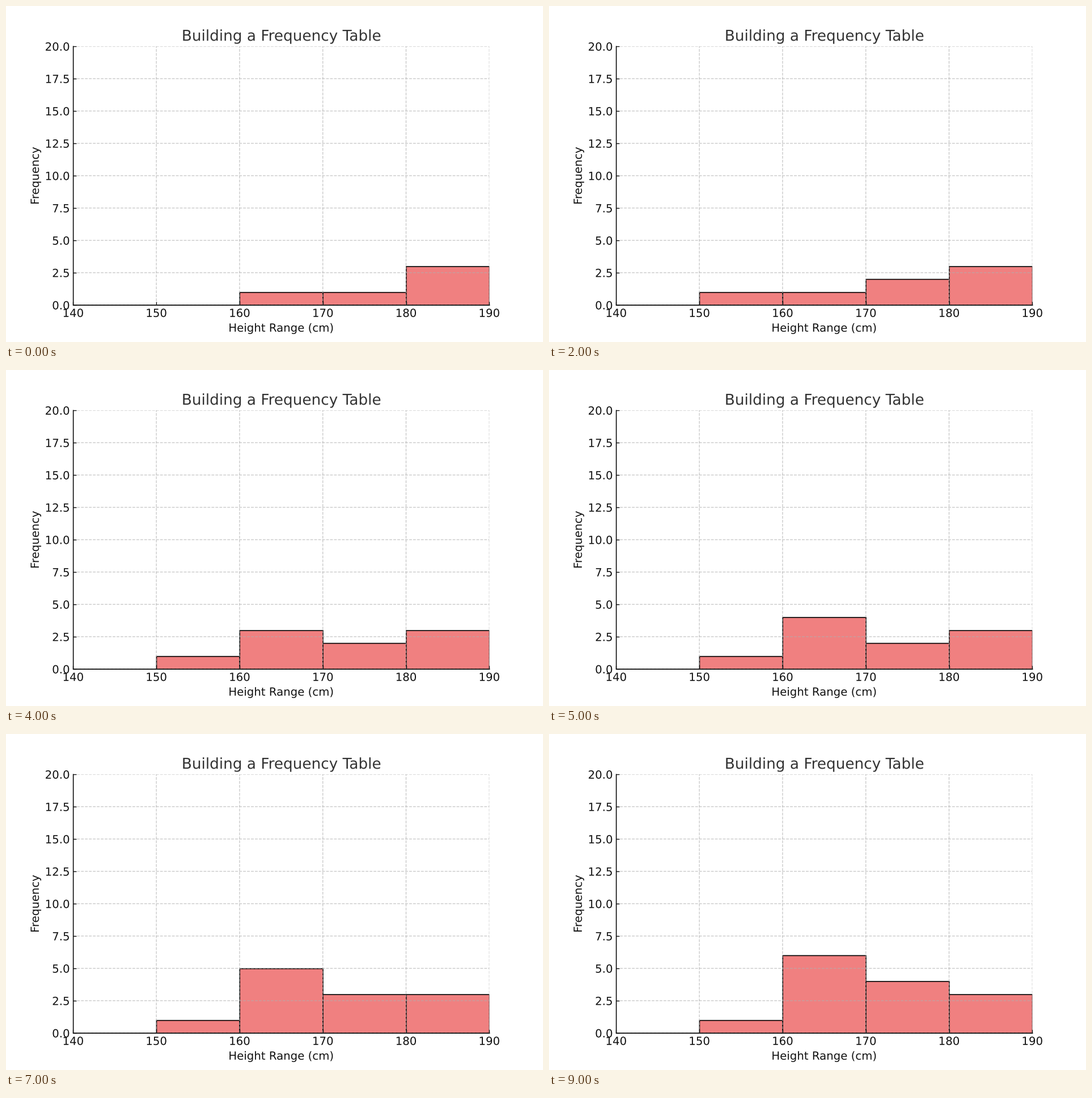
Write a matplotlib script that moves like this. It is 947 px wide and 592 px high and loops after 10000 ms.

```python
import numpy as np
import matplotlib.pyplot as plt
from matplotlib.animation import FuncAnimation
from matplotlib.path import Path
from matplotlib.patheffects import PathPatchEffect
from matplotlib.transforms import ScaledTranslation

DPI = 947 / 8
INK = "#111111"
EDGES = np.arange(140, 191, 10)
START = [160, 170, 180, 180, 180]          # lower class bounds already counted
ADDED = [150, 170, 160, 160, 160, 160, 170, 170, 160]  # one more each second

# Strokes sit on a fine 200-per-inch grid, half a cell right and down.
FINE = 200
CELLS = 38.5                               # fine cells per count

plt.rcParams.update({
    "font.family": "DejaVu Sans",
    "font.size": 12,
    "text.hinting": "none",
    "axes.labelcolor": INK,
    "xtick.color": INK,
    "ytick.color": INK,
    "xtick.direction": "in",
    "ytick.direction": "in",
    "toolbar": "None",
})

fig, ax = plt.subplots(figsize=(8, 592.001 / DPI), dpi=DPI, facecolor="white")
shift = ScaledTranslation(0.5 / FINE, -0.5 / FINE, fig.dpi_scale_trans)

bars = ax.bar(EDGES[:-1], np.zeros(5), width=10, align="edge",
              facecolor="lightcoral", edgecolor="black", linewidth=1.0)
for bar in bars:
    bar.set_transform(ax.transData + shift)

ax.set_xlim(140, 190)
ax.set_ylim(0, 20)
ax.set_xticks(EDGES)
ax.set_yticks(np.arange(0, 20.1, 2.5))
ax.grid(True, color="#b0b0b0", linestyle="--", linewidth=0.8, alpha=0.7)
ax.set_title("Building a Frequency Table", fontsize=16, color="#333333")
ax.set_xlabel("Height Range (cm)")
ax.set_ylabel("Frequency")

ax.spines[:].set_visible(False)
ax.plot([0, 0, 1], [1, 0, 0], transform=ax.transAxes + shift, color=INK,
        linewidth=1.0, solid_capstyle="projecting", solid_joinstyle="miter",
        clip_on=False, snap=False, zorder=2.5)


def soft_clip(artist):
    """Draw between pixels, clipped at the exact edge of the axes."""
    artist.set_snap(False)
    artist.set_clip_box(None)
    artist.set_clip_path(Path.unit_rectangle(), ax.transAxes)


def smooth_text(text):
    """Draw the glyphs as outlines, placed between pixels."""
    text.set_path_effects([PathPatchEffect(
        facecolor=text.get_color(), edgecolor="none", snap=False)])


for artist in [*bars, *ax.get_xgridlines(), *ax.get_ygridlines()]:
    soft_clip(artist)
for text in [ax.title, ax.xaxis.label, ax.yaxis.label,
             *ax.get_xticklabels(), *ax.get_yticklabels()]:
    smooth_text(text)


def update(step):
    counts, _ = np.histogram(START + ADDED[:step], bins=EDGES)
    for bar, count in zip(bars, counts):
        bar.set_height(np.floor(count * CELLS) / CELLS)
    return list(bars)


anim = FuncAnimation(fig, update, frames=len(ADDED) + 1, interval=1000,
                     init_func=lambda: update(0), repeat=True,
                     repeat_delay=0, blit=False)
plt.show()
```
